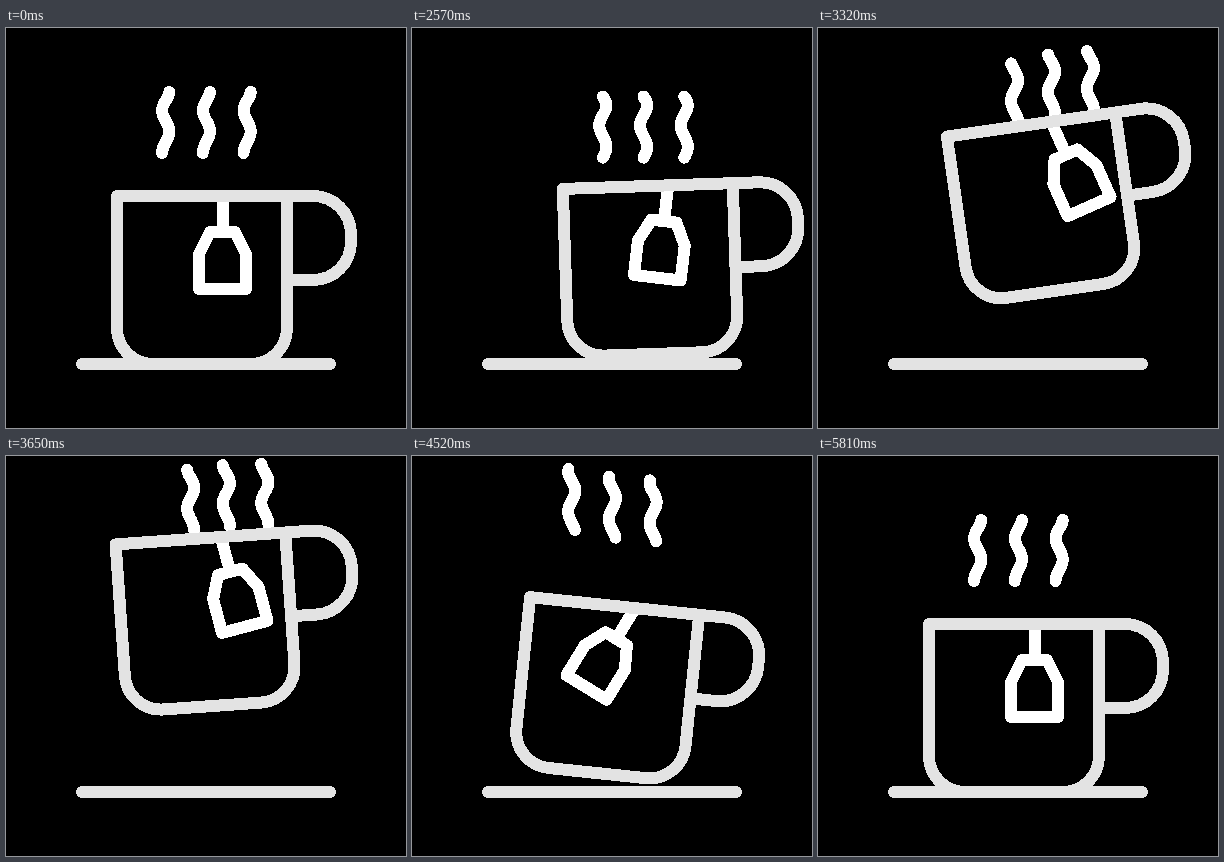
Write an HTML page that moves like this. It is 400 by 400 pixels and loops after 5840 ms.

```html
<!DOCTYPE html>
<html lang="en">
<head>
<meta charset="utf-8">
<title>Tea cup</title>
<style>
  html, body { margin: 0; width: 100%; height: 100%; overflow: hidden; background: #000; }
  svg { display: block; width: 100%; height: 100%; shape-rendering: crispEdges; }
  path { fill: none; stroke: #fff; stroke-width: 12; stroke-linecap: round; stroke-linejoin: round; }
  .china { stroke: #e3e3e3; }
</style>
</head>
<body>
<svg viewBox="0 0 400 400">
  <path class="china" d="M76 336H324"/>
  <path class="steam"/>
  <path class="steam"/>
  <path class="steam"/>
  <path id="bag" d="M216.5 168V203M204 204H229L240 226V261H193V226Z"/>
  <path id="cup" class="china" d="M281 168V300a36 36 0 0 1-36 36H147a36 36 0 0 1-36-36V168H307a38 38 0 0 1 38 38v8a38 38 0 0 1-38 38H281"/>
</svg>
<script>
const LOOP = 5840, START = 2030, STEAM_END = 5600;

const clamp = u => Math.min(1, Math.max(0, u));

// Sine easing from one turning point [time, value] to the next
function swing(...turns) {
  return t => turns.reduce((value, [end, to], i) => {
    if (i === 0) return to;
    const [begin, from] = turns[i - 1];
    const u = clamp((t - begin) / (end - begin));
    return value + (to - from) * (1 - Math.cos(Math.PI * u)) / 2;
  }, 0);
}

const cupX = swing([START, 0], [2820, 55], [3880, -2], [4350, -3], [4800, 0]);
const cupY = swing([2250, 0], [3700, -86], [3800, -86], [4840, 0]);
const cupTurn = swing([2250, 0], [3250, -8.3], [4420, 8], [4720, 0]);
const bagTurn = swing([START, 0], [2400, 9.5], [3330, -24], [4540, 31.5], [5080, -9.5], [5530, 2], [5810, 0]);

const steamX = swing([START, 0], [2850, 42], [4400, 0]);
const steamY = swing([START, 0], [2540, 4.7], [3800, -57], [4180, -57], [5230, 0]);
const stagger = swing([2570, 0], [3100, 1]);
const delays = [120, 0, -50];

const wisps = document.querySelectorAll('.steam');
const bag = document.getElementById('bag');
const cup = document.getElementById('cup');

// The ripple runs down each wisp once, quicker at both ends
function ripple(t) {
  const p = clamp((t - START) / (STEAM_END - START));
  return 2 * p + 0.25 * Math.sin(2 * Math.PI * p);
}

function wave(x, y, phase) {
  const points = [];
  for (let i = 0; i <= 24; i++) {
    const s = i / 24;
    const dx = 3.6 * Math.cos(Math.PI * (3 * s ** 0.92 - phase));
    points.push((x + dx).toFixed(2) + ' ' + (y + 61 * s).toFixed(2));
  }
  return 'M' + points.join('L');
}

function draw(t) {
  const turn = cupTurn(t);
  const move = `translate(${cupX(t)} ${cupY(t)}) rotate(${turn} 196 252)`;
  cup.setAttribute('transform', move);
  bag.setAttribute('transform', `${move} rotate(${bagTurn(t) - turn} 216.5 168)`);
  wisps.forEach((wisp, i) => {
    const late = t - delays[i] * stagger(t);
    wisp.setAttribute('d', wave(159.7 + 40.7 * i + steamX(late), 64 + steamY(late), ripple(t)));
  });
}

const origin = performance.now();
function tick() {
  draw((performance.now() - origin) % LOOP);
  requestAnimationFrame(tick);
}
tick();
</script>
</body>
</html>
```
